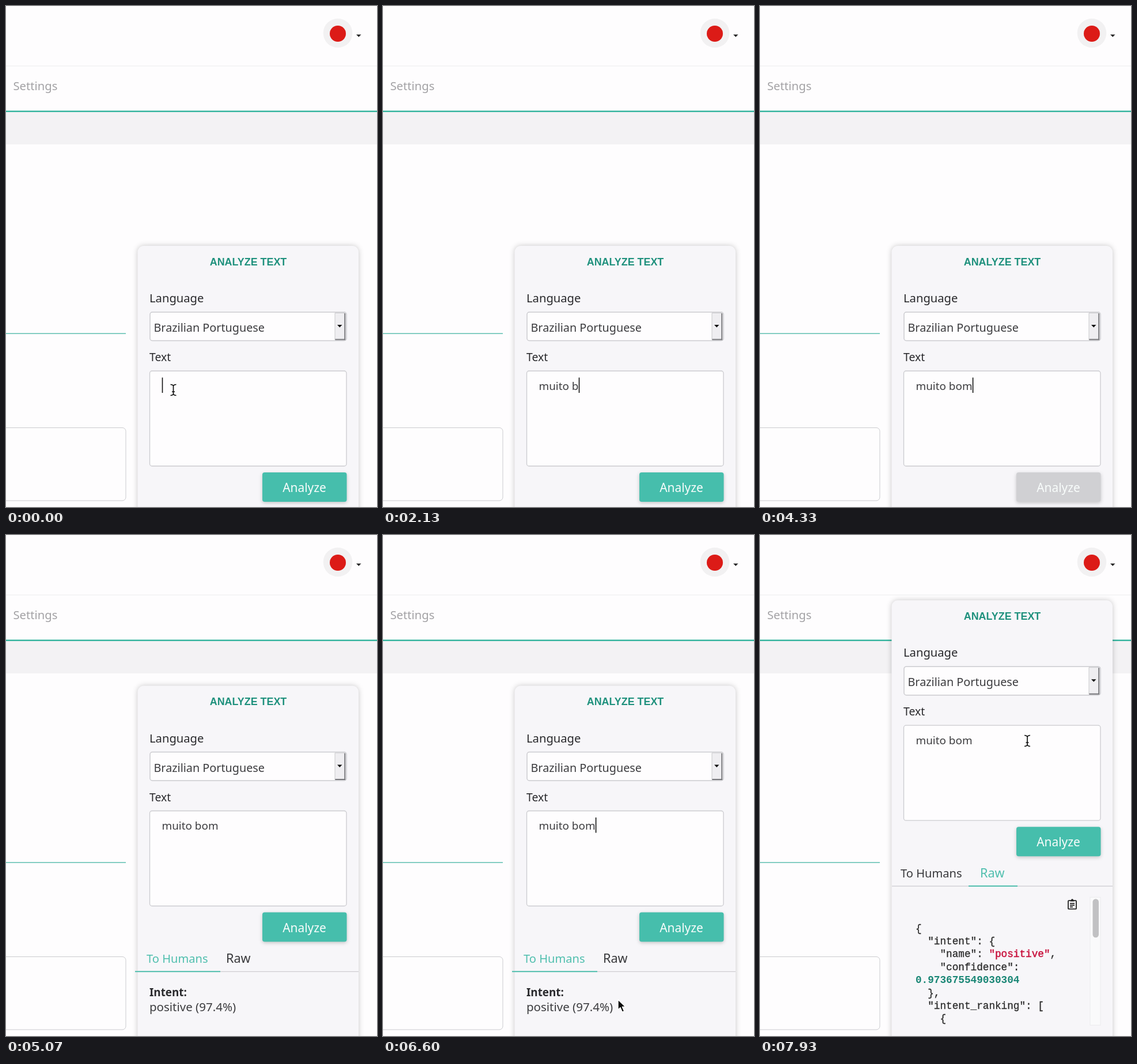
Write an HTML page that moves like this. It is 644 px wide and 869 px high and loops after 8000 ms.

```html
<!DOCTYPE html>
<html lang="en">
<head>
<meta charset="utf-8">
<title>Analyze text</title>
<style>
  html, body { margin: 0; width: 100%; height: 100%; overflow: hidden; background: #fefdfe; }
  svg { display: block; width: 100%; height: 100%; }
  text { font-family: "Noto Sans", "Open Sans", sans-serif; font-size: 19.8px; fill: #3c3c3f; white-space: pre; }
  .strong { font-weight: 500; font-size: 20.2px; fill: #29292c; }
  .title { font: bold 17.9px "Liberation Sans", Arial, sans-serif; fill: #1f917d; }
  .mono text { font: 17.7px "Liberation Mono", "Courier New", monospace; fill: #2b2b2b; stroke: #2b2b2b; stroke-width: .3px; }
  .mono .number { font-weight: bold; fill: #198675; stroke: none; }
  .mono .string { fill: #c9143f; stroke: #c9143f; stroke-width: .5px; }
  .field { fill: #fefdfe; stroke: #cbcbcf; }
  .panel { filter: drop-shadow(0 0 5px rgba(0, 0, 0, .22)); }
  .button { filter: drop-shadow(0 2px 3px rgba(0, 0, 0, .2)); }
</style>
</head>
<body>
<svg viewBox="0 0 644 869">
  <defs>
    <clipPath id="pane"><rect x="228" y="497" width="384.5" height="400"/></clipPath>
  </defs>

  <rect width="644" height="869" fill="#fefdfe"/>
  <rect y="103.5" width="644" height="1" fill="#ededef"/>
  <circle cx="576" cy="47" r="25.3" fill="#f2f1f2"/>
  <circle cx="576" cy="48" r="14" fill="#dc1b17"/>
  <path d="M608 49.500h8.500l-4.250 4.300z" fill="#222"/>
  <text x="12.500" y="146" style="font-weight:500;font-size:20.2px;fill:#a3a2a5">Settings</text>
  <rect y="184" width="644" height="56" fill="#f3f2f4"/>
  <rect y="181.500" width="644" height="2.500" fill="#38b5a0"/>
  <rect y="567.300" width="208" height="1.700" fill="#6fc6b9"/>
  <rect class="field" x="-20" y="731.500" width="228" height="126.500" rx="6"/>

  <g id="panel">
    <rect class="panel" x="228.500" y="0" width="383.500" height="900" rx="11" fill="#f7f6f9"/>
    <text class="title" x="420.500" y="33.500" text-anchor="middle">ANALYZE TEXT</text>

    <text class="strong" x="249" y="98">Language</text>
    <rect class="field" x="250" y="115" width="341" height="49.500" rx="4" stroke-width="1.500"/>
    <text x="256.500" y="149">Brazilian Portuguese</text>
    <rect x="571" y="116.500" width="18" height="46.500" fill="#efeef1"/>
    <path d="M571 163v-46.500h17" fill="none" stroke="#c9c9cc"/>
    <path d="M588.300 117v45.500h-17" fill="none" stroke="#77777b" stroke-width="2"/>
    <path d="M575 137h8.500l-4.250 4.500z" fill="#111"/>

    <text class="strong" x="249" y="200" style="font-size:19.4px">Text</text>
    <rect class="field" x="249.500" y="217" width="341.500" height="165" rx="4" stroke-width="1.300"/>
    <text id="typed" x="270.500" y="249.500" style="font-size:18.9px"></text>
    <rect id="caret" y="228.500" width="1.600" height="26.500" fill="#111"/>

    <rect id="button" class="button" x="445" y="393" width="146.500" height="51" rx="4"/>
    <text x="518" y="427" text-anchor="middle" style="font-weight:500;font-size:20.9px;fill:#f8fcfb">Analyze</text>

    <g id="result">
      <text id="humans" x="244" y="480.700" style="font-size:20.1px">To Humans</text>
      <text id="raw" x="382" y="480.700" style="font-size:21.6px">Raw</text>
      <rect x="229" y="495.200" width="383" height="1.300" fill="#cfced2"/>
      <rect id="ink" y="494.700" height="2" fill="#50bfae"/>
      <g clip-path="url(#pane)">
        <g id="slider">
          <text class="strong" x="249" y="538.800" style="font-weight:600;font-size:18.8px">Intent:</text>
          <text x="249" y="564.800" style="font-size:20.5px">positive (97.4%)</text>
          <g id="json" class="mono">
            <rect x="573" y="515" width="18" height="222" fill="#fafafb" stroke="#ececee"/>
            <rect x="577.500" y="518" width="10.500" height="67" rx="5.200" fill="#c1c1c3"/>
            <g fill="none" stroke="#222" stroke-width="1.800">
              <rect x="535" y="521" width="14" height="14.500" rx="1"/>
              <path d="M538.500 521.500h7M538 526h8M538 529h8M538 532h5"/>
            </g>
            <circle cx="542" cy="520" r="2" fill="#222"/>
          </g>
        </g>
      </g>
    </g>
  </g>

  <g id="arrow">
    <path d="M0 0v17.500l4-3.700 3.300 7.700 3.400-1.500-3.300-7.500h5.600z" fill="#0b0b0b" stroke="#fff" stroke-width="1.400" stroke-linejoin="round"/>
  </g>
  <g id="beam" fill="none">
    <path d="M-5-9.500q4 0 5 2.500q1-2.500 5-2.500M-5 9.500q4 0 5-2.500q1 2.500 5 2.500M0-7.500v15M-2.500 3h5" stroke="#fff" stroke-width="3.500"/>
    <path d="M-5-9.500q4 0 5 2.500q1-2.500 5-2.500M-5 9.500q4 0 5-2.500q1 2.500 5 2.500M0-7.500v15M-2.500 3h5" stroke="#111" stroke-width="1.700"/>
  </g>
</svg>

<script>
const LOOP = 8000, RESULT = 4800, SWITCH = 7200, PAGE = 341.5;
const $ = id => document.getElementById(id);
const set = (id, attrs) => { for (const k in attrs) $(id).setAttribute(k, attrs[k]); };
const show = (id, on) => set(id, { visibility: on ? 'visible' : 'hidden' });
const clamp = v => Math.max(0, Math.min(1, v));
const ramp = (t, from, to) => clamp((t - from) / (to - from));
const ease = p => p * p * (3 - 2 * p);

const WORD = 'muito bom';
const KEYS = [1470, 1670, 1740, 1870, 1930, 2000, 2130, 2270, 2330];
// Caret flips between on and off at each of these times, starting on.
const BLINKS = [330, 870, 1400, 1470, 2600, 3130, 3660, 4330, 4860, 5400, 5930, 6470, 7000];

// Each pointer trip: [time, x, y] stops; hidden between trips.
const TRIPS = [
  [[0, 290.5, 666], [70, 290.5, 666], [270, 170, 760], [330, 120, 800]],
  [[2930, 62, 780], [3400, 297, 768], [3600, 300, 768], [3730, 355, 770], [3930, 500, 832], [4070, 500, 832]],
  [[5900, 420, 40], [6000, 370, 217], [6070, 370, 217], [6270, 262, 736], [6400, 270, 800], [6600, 408, 806],
   [6730, 408, 806], [7130, 409.5, 746.5], [7450, 409.5, 746.5], [7860, 464, 357], [LOOP, 464, 357]]
];

const LINES = [
  [0, '{'],
  [2, '"intent": {'],
  [4, '"name": ', '"positive"', ','],
  [4, '"confidence":'],
  [0, '0.973675549030304'],
  [2, '},'],
  [2, '"intent_ranking": ['],
  [4, '{']
];

function buildJson() {
  set('json', { transform: `translate(${PAGE} 0)` });
  LINES.forEach(([indent, ...parts], row) => {
    const line = document.createElementNS('http://www.w3.org/2000/svg', 'text');
    line.setAttribute('x', 270 + indent * 10.62);
    line.setAttribute('y', 574.5 + row * 22.4);
    if (/^\d/.test(parts[0])) line.setAttribute('class', 'number');
    parts.forEach((part, i) => {
      const span = document.createElementNS('http://www.w3.org/2000/svg', 'tspan');
      span.textContent = part;
      if (i === 1) span.setAttribute('class', 'string');
      line.append(span);
    });
    $('json').append(line);
  });
}

function pointerAt(t) {
  const trip = TRIPS.find(s => t >= s[0][0] && t < s[s.length - 1][0]);
  if (!trip) return null;
  const i = trip.findIndex(s => s[0] > t);
  const [t0, x0, y0] = trip[i - 1], [t1, x1, y1] = trip[i];
  const p = ramp(t, t0, t1);
  return [x0 + (x1 - x0) * p, y0 + (y1 - y0) * p];
}

function drawPointer(t, top) {
  const pos = pointerAt(t);
  const [x, y] = pos || [0, 0];
  const overText = x > 249 && x < 592 && y > top + 217 && y < top + 382;
  show('arrow', pos && !overText);
  show('beam', pos && overText);
  set(overText ? 'beam' : 'arrow', { transform: `translate(${x} ${y})` });
}

function mix(a, b, p) {
  return `rgb(${a.map((v, i) => Math.round(v + (b[i] - v) * p))})`;
}

function draw(t) {
  const top = t < RESULT ? 416 : t < SWITCH ? 261.5 : 113.2;
  set('panel', { transform: `translate(0 ${top})` });

  const typed = $('typed');
  typed.textContent = WORD.slice(0, KEYS.filter(k => k <= t).length);
  const width = typed.textContent ? typed.getComputedTextLength() : 0;
  set('caret', { x: 270.7 + width });
  show('caret', BLINKS.filter(b => b <= t).length % 2 === 0);

  const grey = ramp(t, 3930, 4070) - ramp(t, RESULT, 5000);
  set('button', { fill: mix([70, 190, 172], [208, 208, 211], grey) });

  const raw = t >= SWITCH;
  show('result', t >= RESULT);
  $('humans').style.fill = raw ? '#38383b' : '#50bfae';
  $('raw').style.fill = raw ? '#50bfae' : '#38383b';
  set('ink', raw ? { x: 362, width: 85 } : { x: 224, width: 148 });
  const slide = PAGE * ease(ramp(t, 7255, 7600));
  set('slider', { transform: `translate(${-slide} 0)` });
  show('json', raw);

  drawPointer(t, top);
}

function tick() {
  draw(performance.now() % LOOP);
  requestAnimationFrame(tick);
}

buildJson();
tick();
</script>
</body>
</html>
```
